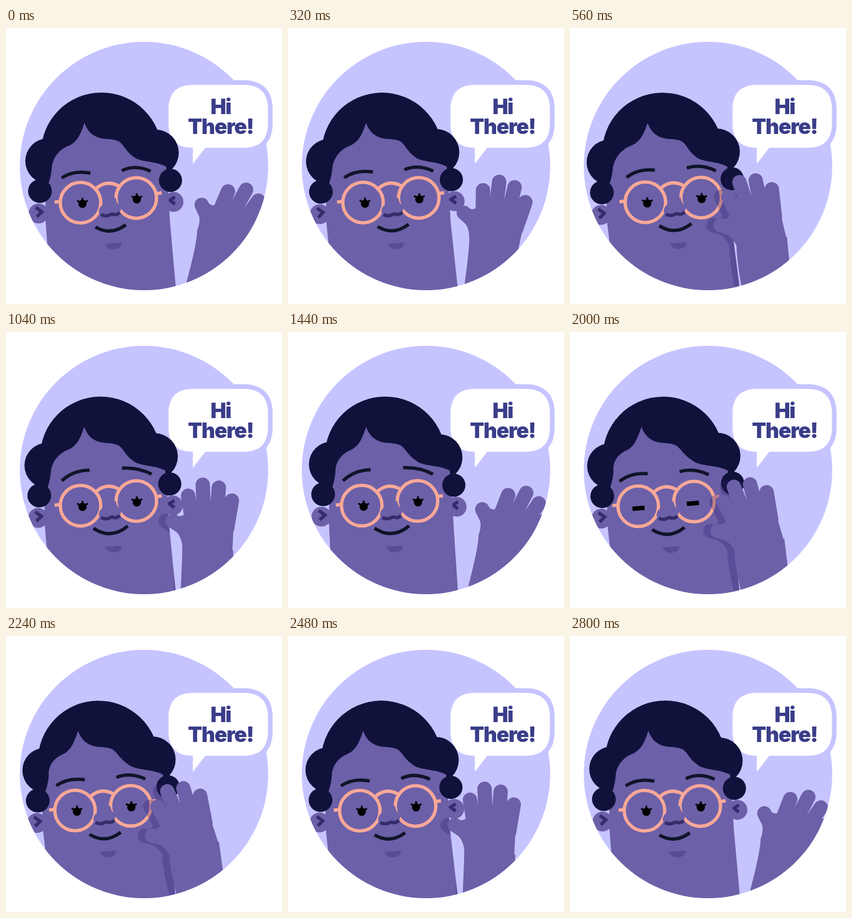
An HTML page for the animation above (2.88 s loop, 500 by 500 pixels).

```html
<!DOCTYPE html>
<html lang="en">
<head>
<meta charset="utf-8">
<title>Hi There</title>
<style>
html, body { margin: 0; width: 100%; height: 100%; overflow: hidden; background: #fff; }
svg { display: block; width: 100%; height: 100%; }
.skin { fill: #6c60a8; }
.hair { fill: #11123b; }
.line { fill: none; stroke-width: 6; }
.ink { stroke: #101428; }
.mark { stroke: #352c6c; }
.rim { stroke: #f9a898; }
.label { font: 900 38px Inter, Roboto, sans-serif; letter-spacing: -1.3px; fill: #3a3d89; text-anchor: middle; }
</style>
</head>
<body>
<svg viewBox="0 0 500 500">
  <defs>
    <clipPath id="disc"><circle cx="250" cy="250" r="225"/></clipPath>
    <clipPath id="faceClip"><path id="faceEdge"/></clipPath>
    <g id="arm">
      <path id="forearm" stroke="none"/>
      <g id="hand">
        <path d="M-46-12C-48-26-52-34-64-44L-58-66Q-46-62-41-68L-36-86H20L50-76L46-20L44 4H-30Z" stroke="none"/>
        <path d="M-62-56L-42-42M-33-101L-26-45M-6-120L-5-45M23-114L16-45M46-90L36-40"
              stroke-width="26" stroke-linecap="round" fill="none"/>
      </g>
    </g>
    <g id="eye">
      <circle r="7.5"/>
      <path d="M-9.500-6L0 0V-11M0 0L9.500-6" fill="none" stroke="#000" stroke-width="3.200"/>
    </g>
    <rect id="lid" x="-14" y="-3.500" width="22" height="8" transform="rotate(-5)"/>
  </defs>

  <circle cx="250" cy="250" r="225" fill="#c6c4ff"/>
  <path d="M339 103H430Q474.500 103 474.500 147V173Q474.500 217 430 217H361L338.500 246V217Q294.500 217 294.500 173V147Q294.500 103 339 103Z"
        fill="#fff" stroke="#c6c4ff" stroke-width="17" stroke-linejoin="round" paint-order="stroke"/>
  <text class="label" x="389" y="156">Hi</text>
  <text class="label" x="389" y="192">There!</text>

  <g clip-path="url(#disc)">
    <g id="head">
      <g class="hair">
        <ellipse cx="173" cy="226" rx="109.500" ry="109"/>
        <circle cx="76" cy="241" r="41"/>
        <circle cx="271" cy="226" r="42"/>
      </g>
      <g class="skin">
        <circle cx="59" cy="336" r="18"/>
        <circle cx="303.500" cy="315" r="18"/>
      </g>
      <path class="line mark" d="M54 325L65 333L56 342M306 306L297 312L306 319"/>
    </g>
    <path id="face" class="skin"/>
    <g id="buns" class="hair">
      <circle cx="61.500" cy="295.500" r="21.500"/>
      <circle cx="298" cy="276" r="21"/>
    </g>
    <g id="features">
      <g class="line rim">
        <circle cx="135" cy="316.500" r="36.700"/>
        <circle cx="236" cy="308" r="36.700"/>
        <path d="M163 291Q183 273 207 288M88 315.500L98 314.500M273 300L282 298.500"/>
      </g>
      <path class="skin" d="M176 312Q177 320 171 324Q166 332 170 338L205 335Q211 328 206 321Q200 318 199 308Z"/>
      <path class="line mark" d="M172 338Q180 342 187 339Q191 336 196 338Q202 339 206 334"/>
      <path d="M179 391L210 389Q208 401 195 401Q183 401 179 391Z" fill="#584d96"/>
      <path id="brows" class="line ink"/>
      <path id="mouth" class="line ink"/>
      <g id="open">
        <use href="#eye" x="138.500" y="318.500"/>
        <use href="#eye" x="237" y="310.500"/>
      </g>
      <g id="shut">
        <use href="#lid" x="138.500" y="319.500"/>
        <use href="#lid" x="237" y="310.500"/>
      </g>
    </g>
    <g clip-path="url(#faceClip)">
      <use href="#arm" x="-13" fill="#2c1c6c" stroke="#2c1c6c" opacity=".28"/>
    </g>
    <use href="#arm" fill="#6c60a8" stroke="#6c60a8"/>
  </g>
</svg>
<script>
const LOOP = 2880, STEP = 80, WAVE = LOOP / 2;
const $ = id => document.getElementById(id);
const set = (id, name, value) => $(id).setAttribute(name, value);

const cycle = (t, period) => Math.cos(2 * Math.PI * t / period);
// Smooth rise and fall from 0 to 1 to 0 between two times.
const hump = (t, from, to) =>
  t < from || t > to ? 0 : Math.sin(Math.PI * (t - from) / (to - from)) ** 2;

const sway = t => 3.5 * cycle(t, WAVE) - 1.5 * cycle(t, LOOP) - 2;
const glance = t => -11.5 * hump(t, 1260, 2840);

function drawHead(t) {
  const h = sway(t), p = .3 * h + glance(t), m = (h + p) / 2;
  const face = `M${72 + h} 295C${78 + h} 280 ${82 + h} 268 ${83 + h} 252
    C${85 + m} 234 ${97 + m} 220 ${112 + m} 214
    C${130 + p} 207 ${136 + p} 190 ${142 + p} 172
    C${150 + p} 192 ${162 + p} 199 ${180 + p} 201
    C${218 + p} 202 ${205 + p} 214 ${232 + m} 234
    C${246 + m} 244 ${268 + h} 240 ${290 + h} 251
    L${294 + h} 300L${297 + h} 350L308.5 480H76L${75 + h / 2} 395L${71 + h} 340Z`;
  const pose = `translate(${h} 0) rotate(${.24 * h} 180 230)`;
  set('head', 'transform', pose);
  set('buns', 'transform', pose);
  set('face', 'd', face);
  set('faceEdge', 'd', face);
}

function drawFeatures(t) {
  const u = hump(t, 0, 2600), shut = t >= 1920 && t < 2080;
  set('features', 'transform', `translate(${1.5 * hump(t, 0, 1120) + glance(t)} ${-2 * u})`);
  set('brows', 'd', `M101 271.500Q${123 - 2 * u} ${257 - 5 * u} ${153 - 2 * u} ${263 - 12 * u}
    M210 ${258.5 - 11 * u}Q${234 + 6 * u} 246.500 ${262 + 2 * u} 259.500`);
  set('mouth', 'd', `M${162 - 4 * u} ${360.5 - 3.5 * u}Q190 ${377 + 2 * u} ${217 + 4 * u} ${356.5 - 3.5 * u}`);
  set('open', 'visibility', shut ? 'hidden' : 'visible');
  set('shut', 'visibility', shut ? 'visible' : 'hidden');
}

function drawArm(t) {
  // The second wave runs slightly ahead of the first.
  const turn = 3 + 27 * cycle(t + 108 * hump(t, 1000, 2300), WAVE);
  const r = turn * Math.PI / 180, c = Math.cos(r), s = Math.sin(r);
  const wx = 367 + .8 * turn - .012 * turn * turn;
  const wy = 397 + .22 * turn - .004 * turn * turn;
  const place = (x, y) => [wx + x * c - y * s, wy + x * s + y * c];
  const [lx, ly] = place(-46, -12), [rx, ry] = place(46, 0);
  set('hand', 'transform', `translate(${wx} ${wy}) rotate(${turn})`);
  set('forearm', 'd', `M${lx} ${ly}Q${lx} ${ly + 25} ${316 + .17 * turn} 482H${412 + .5 * turn}L${rx} ${ry}Z`);
}

const start = performance.now();
function tick() {
  const t = Math.floor((performance.now() - start) % LOOP / STEP) * STEP;
  drawHead(t);
  drawFeatures(t);
  drawArm(t);
  requestAnimationFrame(tick);
}
tick();
</script>
</body>
</html>
```
